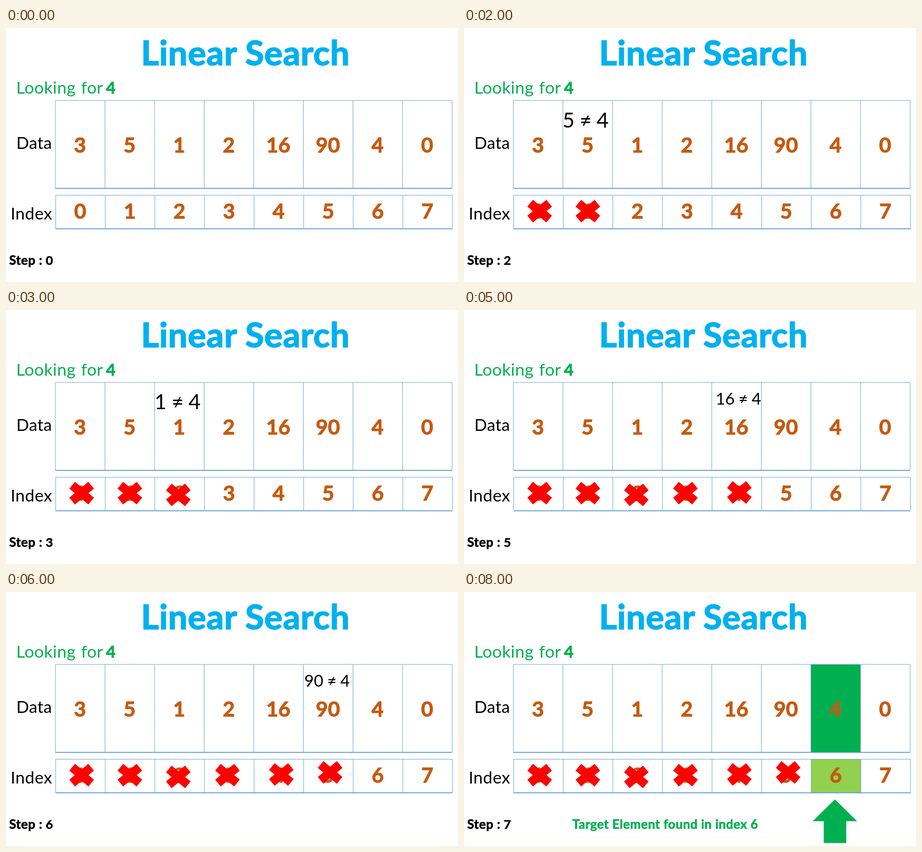
These frames come from a looping animation (998 by 561 pixels, 9000 ms). An HTML page:

```html
<!DOCTYPE html>
<html lang="en">
<head>
<meta charset="utf-8">
<title>Linear Search</title>
<style>
  html, body { margin: 0; width: 100%; height: 100%; overflow: hidden; background: #fff; }
  svg { display: block; width: 998px; height: 561px; }
  text { font-family: Carlito, Lato, sans-serif; white-space: pre; fill: currentColor; }
  .mid { text-anchor: middle; }
  .bold { font-weight: 700; stroke: currentColor; stroke-width: 0.026em; }
  .blue { color: #00b0f0; }
  .green { color: #00b050; }
  .cell { font-size: 46px; color: #c55a11; }
  .grid { stroke: #5b9bd5; fill: none; }
  .cross { stroke: #f00; stroke-width: 19.3; fill: none; }
</style>
</head>
<body>
<svg id="stage" viewBox="0 0 998 561">
  <text class="blue mid bold" x="528.6" y="82" font-size="75.5" letter-spacing="0.8">Linear Search</text>
  <text class="green" x="22.5" y="145" font-size="37.5" letter-spacing="0.35" word-spacing="2">Looking for</text>
  <text class="green mid bold" x="231.3" y="145" font-size="36.5">4</text>
  <text x="22.8" y="267" font-size="37" letter-spacing="0.3">Data</text>
  <text x="10.2" y="423" font-size="37" letter-spacing="0.6">Index</text>
  <text class="bold" x="7" y="523" font-size="28" letter-spacing="0.6">Step :</text>
  <text class="mid bold" id="step" x="95.8" y="523" font-size="27.5">0</text>
</svg>
<script>
const stage = document.getElementById('stage');
const step = document.getElementById('step');
const PITCH = 109.5, STEP_MS = 1000, STEPS = 9;
const timed = [];

function add(tag, attrs, text) {
  const el = document.createElementNS('http://www.w3.org/2000/svg', tag);
  for (const key in attrs) el.setAttribute(key, attrs[key]);
  if (text !== undefined) el.textContent = text;
  stage.appendChild(el);
  return el;
}

// Show an element from one step up to (not including) another.
function during(from, to, el) {
  timed.push({ from, to, el });
}

function row(left, top, bottom, baseline, values, found) {
  const right = left + PITCH * 8;
  during(8, STEPS, add('rect', {
    x: left + PITCH * 6, y: top, width: PITCH, height: bottom - top, fill: found
  }));
  for (let i = 0; i <= 8; i++) {
    const x = left + PITCH * i;
    add('path', { class: 'grid', d: `M${x} ${top}V${bottom}`, 'stroke-width': 1 });
  }
  add('path', { class: 'grid', d: `M${left} ${top}H${right}`, 'stroke-width': 1 });
  add('path', { class: 'grid', d: `M${left} ${bottom}H${right}`, 'stroke-width': 2 });
  values.forEach((v, i) =>
    add('text', { class: 'cell mid bold', x: left + PITCH * (i + 0.5) - 0.5, y: baseline }, v));
}

row(109, 160, 354.3, 275, [3, 5, 1, 2, 16, 90, 4, 0], '#00b050');
row(109.7, 369.4, 443.4, 421, [0, 1, 2, 3, 4, 5, 6, 7], '#92d050');

// Comparison label with its centre, baseline and size, then the centre of the cross.
[
  ['3 ≠ 4', 167.5, 223, 46, 167, 404.5],
  ['5 ≠ 4', 268.5, 220, 46, 273.5, 404.5],
  ['1 ≠ 4', 378.8, 219, 46, 380.5, 408.3],
  ['2 ≠ 4', 491.5, 219, 46, 489, 404.5],
  ['16 ≠ 4', 606, 209, 36, 608, 403],
  ['90 ≠ 4', 709, 209, 36, 715.7, 398.5]
].forEach(([label, x, y, size, cx, cy], i) => {
  during(i + 1, i + 2, add('text', {
    class: 'mid', x, y, 'font-size': size, 'word-spacing': -0.8
  }, label));
  during(i + 1, STEPS, add('path', {
    class: 'cross',
    d: `M${cx - 21} ${cy - 17.5}l42 35M${cx + 21} ${cy - 17.5}l-42 35`
  }));
});

during(7, 8, add('text', {
  class: 'mid bold green', x: 817, y: 203, 'font-size': 36
}, '4 == 4'));
during(7, STEPS, add('path', {
  fill: '#00b050', d: 'M819 458L868 506.3H844V554.6H794.3V506.3H770Z'
}));
during(8, STEPS, add('text', {
  class: 'mid bold green', x: 444.2, y: 523, 'font-size': 28, 'letter-spacing': 0.5
}, 'Target Element found in index 6'));

const start = performance.now();
let shown = -1;

function draw() {
  const now = Math.floor(Math.max(0, performance.now() - start) / STEP_MS) % STEPS;
  if (now !== shown) {
    shown = now;
    step.textContent = Math.min(now, 7);
    for (const { from, to, el } of timed) {
      el.style.display = now >= from && now < to ? '' : 'none';
    }
  }
  requestAnimationFrame(draw);
}
draw();
</script>
</body>
</html>
```
